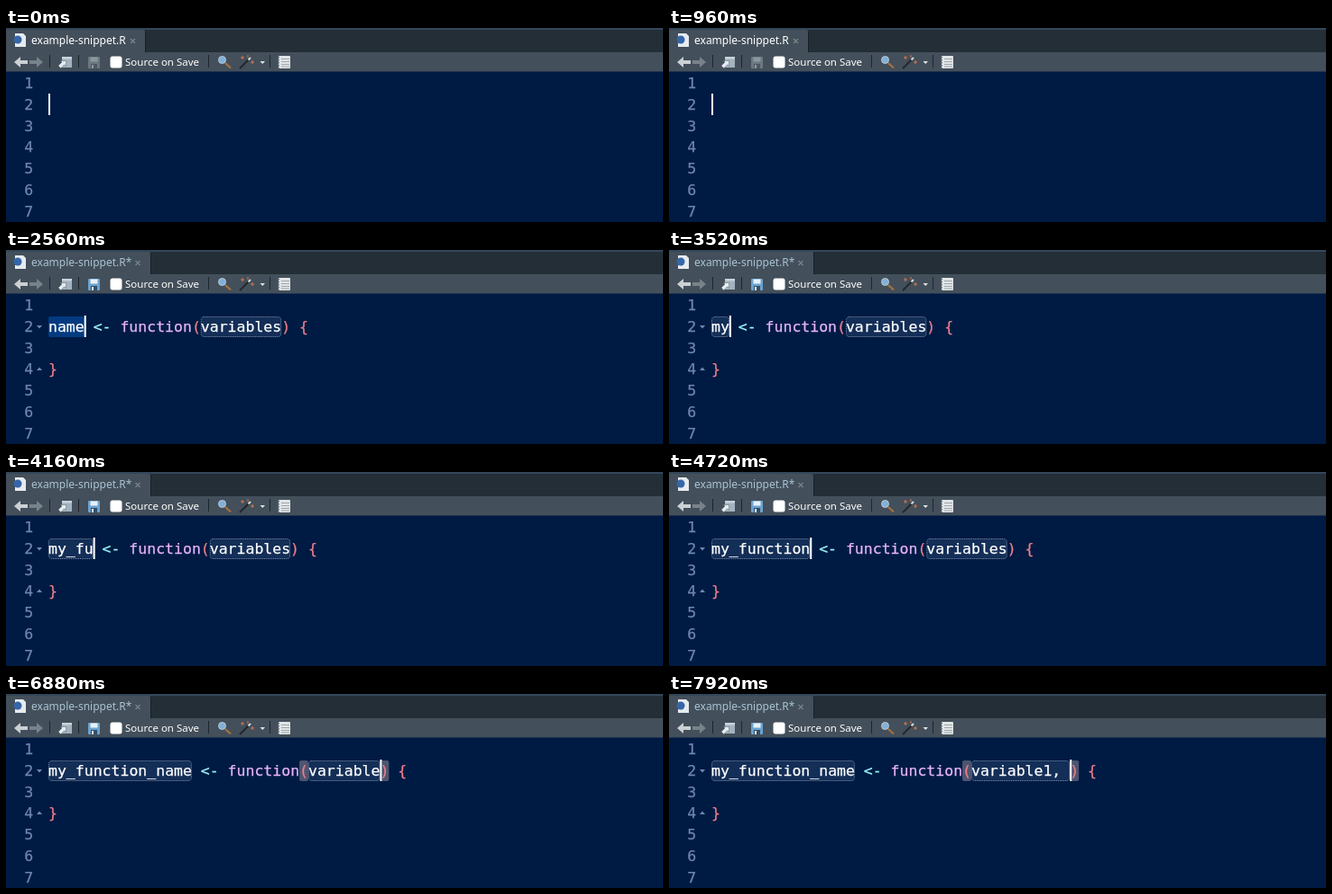
These frames come from a looping animation (728 px wide and 216 px high, 8 s). An HTML page:

```html
<!DOCTYPE html>
<html lang="en">
<head>
<meta charset="utf-8">
<title>Code snippet</title>
<style>
  html, body { margin: 0; width: 100%; height: 100%; overflow: hidden; background: #001b43; }
  svg { display: block; width: 728px; height: 216px; }
  text { white-space: pre; }
  .code { font: 16.5px "DejaVu Sans Mono", monospace; }
  .code text { stroke-width: .25px; }
  .ui { font-family: "Noto Sans", "Open Sans", sans-serif; font-weight: 500; }
</style>
</head>
<body>
<svg viewBox="0 0 728 216">
  <rect width="728" height="216" fill="#001b43"/>
  <rect width="728" height="28" fill="#242e36"/>
  <rect width="728" height="2" fill="#34475a"/>
  <g id="tab"></g>
  <rect y="27" width="728" height="21.500" fill="#434f5a"/>

  <path d="M10 6h9l3 3v12h-12z" fill="#e6ebef"/>
  <circle cx="13" cy="13" r="4.5" fill="#3566a8"/>

  <path d="M9 38l7-6v4h8v4h-8v4z" fill="#cbd0d3"/>
  <path d="M41 38l-7-6v4h-8v4h8v4z" fill="#77828a"/>
  <path d="M48.500 30v14M80.500 30v14M224.500 30v14M292.500 30v14" stroke="#1d252c"/>

  <path d="M62 32h11v12h-11z" fill="#a3b2bf"/>
  <path d="M62 32h11v2.500h-11z" fill="#c8d3dc"/>
  <path d="M58 42l4-4-1.500-1.500h6v6l-1.800-1.700-4 4z" fill="#e6ecf0" stroke="#66747f" stroke-width=".6"/>
  <g id="save"></g>
  <rect x="115.500" y="31.500" width="13" height="13" rx="2.500" fill="#fff"/>
  <text class="ui" x="132" y="42" font-size="11.5" fill="#fff">Source on Save</text>

  <path d="M243 39l6 5.500" stroke="#a9713f" stroke-width="2.200"/>
  <circle cx="239.500" cy="35.500" r="4" fill="#82b0d8" stroke="#b9c9d5"/>
  <path d="M259 45l11-11" stroke="#23282c" stroke-width="2"/>
  <path d="M268.500 35.500l2.500-2.500" stroke="#dcdcdc" stroke-width="2"/>
  <path d="M262 31v4M260 33h4M273 36v4M271 38h4M268 30v3" stroke="#d3764c"/>
  <path d="M281.500 37h5.500l-2.750 3z" fill="#e0e4e6"/>
  <rect x="302" y="31" width="13" height="14" rx="1" fill="#e1e5e7"/>
  <path d="M305 34.500h9M305 37.500h9M305 40.500h9M305 43h9" stroke="#9ea7ad"/>
  <path d="M302 32v13" stroke="#69747c" stroke-width="2" stroke-dasharray="1.500 1.500"/>

  <g id="numbers" class="code"></g>
  <g id="editor" class="code"></g>
</svg>
<script>
const LOOP = 8000, CHAR = 9.93, LEFT = 47, ROW = 23.75;
const POPUP = 1760, PICK_FIRST = 2160, EXPAND = 2400, NEXT_FIELD = 5680;
const PINK = '#ee7f8c', CYAN = '#99f6fa', PURPLE = '#e6b4fa', GUTTER = '#7086b2';

const typing = [
  { text: 'fun', at: [1200, 1360, 1520] },
  { text: 'my_function_name', at: [3120, 3280, 3680, 4000, 4080, 4240, 4400, 4480,
      4560, 4640, 4720, 4960, 5120, 5200, 5360, 5440] },
  { text: 'variable1, ', at: [6240, 6320, 6400, 6480, 6560, 6640, 6720, 6800, 7040, 7360, 7520] }
];
const keyTimes = [-400, ...typing.flatMap(w => w.at), EXPAND, NEXT_FIELD].sort((a, b) => a - b);

const byId = id => document.getElementById(id);
const escapeText = s => s.replace(/&/g, '&amp;').replace(/</g, '&lt;');
const typed = ({ text, at }, t) => text.slice(0, at.filter(time => time <= t).length);
const colX = col => LEFT + col * CHAR;
const baseline = row => 67 + (row - 1) * ROW;
const label = (x, y, s, fill = '#fff', extra = '') =>
  `<text x="${x}" y="${y}" fill="${fill}" stroke="${fill}" ${extra}>${escapeText(s)}</text>`;
const rect = (x, y, w, h, fill, extra = '') =>
  `<rect x="${x}" y="${y}" width="${w}" height="${h}" fill="${fill}" ${extra}/>`;

const field = (col, length) => rect(colX(col) + .5, 74.5, length * CHAR - 1, 22, '#132e57',
  'rx="3" stroke="#8093b2" stroke-dasharray="1 1"');
const selection = (col, length) => rect(colX(col), 74, length * CHAR, 23, '#043b80', 'rx="2"');
const bracket = col => rect(colX(col), 74, CHAR, 23, '#4d5570', 'rx="2"');

function tab(modified) {
  const right = modified ? 160 : 154, x = modified ? 146 : 140.5;
  return `<path d="M0 2h${right - 2}q2 0 2 2v24h-${right}z" fill="#434f5a"/>` +
    `<path d="M${right + .5} 4v23" stroke="#182027"/>` +
    label(28, 18, 'example-snippet.R' + (modified ? '*' : ''), modified ? '#a9c3d3' : '#fff',
      'class="ui" font-size="12" stroke-width="0"') +
    `<path d="M${x - 2.5} 12l5 5m0-5l-5 5" stroke="#77838c" stroke-width="1.3"/>`;
}

function saveIcon(modified) {
  const [body, trim] = modified ? ['#6ba3d0', '#e8f1f7'] : ['#6b7882', '#8c979f'];
  return rect(91, 32, 13, 13, body, 'rx="1"') + rect(93.5, 32.5, 8, 5, trim) +
    rect(94, 40, 7, 5, modified ? '#354f68' : '#4d5962') + rect(95, 41, 2, 4, trim);
}

function popup(selected) {
  const items = [['fun', '{snippet}'], ['function', '{base}'],
    ['functionBody', '{methods}'], ['functionBody<-', '{methods}']];
  let out = rect(38, 103, 290, 120, '#000', 'opacity=".2"') +
    rect(38.5, 101.5, 287, 120, '#262e32', 'stroke="#4d575e"') +
    rect(41, 104 + selected * 28, 282, 26, '#475057');
  items.forEach(([name, source], i) => {
    const y = 122.5 + i * 28;
    out += i
      ? `<path d="M46.500 ${y - 6}l5-5.500 5.500 3-5 5.500z" fill="#66afd4"/>`
      : '<path d="M47.500 110h5.500l3 3v7h-8.500z" fill="#eef0f1"/><path d="M49 115h5.500M49 117.500h5.500" stroke="#7c868c" stroke-width=".8"/>';
    out += label(64, y, name) + label(311.5, y, source, '#8a8f92', 'text-anchor="end"');
  });
  return out + '<path d="M142.500 148.500v13.500l3.200-3 2.200 5 2.400-1-2.200-4.800h4.200z" fill="#000" stroke="#fff"/>';
}

function expanded(t) {
  const name = typed(typing[1], t) || 'name';
  const newArgs = typed(typing[2], t);
  const args = newArgs || 'variables';
  const open = name.length + 12, argCol = open + 1, close = argCol + args.length;
  const inArgs = t >= NEXT_FIELD;
  const code = (col, s, fill) => label(colX(col), baseline(2), s, fill);

  let out = field(0, name.length) + field(argCol, args.length);
  if (newArgs) out += bracket(open) + bracket(close);
  else if (inArgs) out += selection(argCol, args.length);
  else if (t < typing[1].at[0]) out += selection(0, name.length);

  out += code(0, name) + code(name.length + 1, '<-', CYAN) +
    code(name.length + 4, 'function', PURPLE) + code(open, '(', PINK) + code(argCol, args) +
    code(close, ')', PINK) + code(close + 2, '{', PINK) + label(LEFT, baseline(4), '}', PINK) +
    `<path d="M34 84h6l-3 3.500zM34 134h6l-3-3.500z" fill="${GUTTER}"/>`;
  return { out, col: inArgs ? close : name.length };
}

function editor(t) {
  let out, col;
  if (t >= EXPAND) {
    ({ out, col } = expanded(t));
  } else {
    const word = typed(typing[0], t);
    out = label(LEFT, baseline(2), word);
    col = word.length;
  }
  const lastKey = keyTimes.filter(time => time <= t).pop();
  if ((t - lastKey) % 960 < 480) out += rect(colX(col), 73, 2, 24, '#fff');
  if (t >= POPUP && t < EXPAND) out += popup(t < PICK_FIRST ? 1 : 0);
  return out;
}

const shown = {};
function put(id, markup) {
  if (shown[id] === markup) return;
  shown[id] = markup;
  byId(id).innerHTML = markup;
}

function render(t) {
  const modified = t >= typing[0].at[0];
  put('tab', tab(modified));
  put('save', saveIcon(modified));
  put('editor', editor(t));
}

put('numbers', [1, 2, 3, 4, 5, 6, 7].map(n => label(20.3, baseline(n), String(n), GUTTER)).join(''));

const start = performance.now();
function tick() {
  render((performance.now() - start) % LOOP);
  requestAnimationFrame(tick);
}
tick();
</script>
</body>
</html>
```
